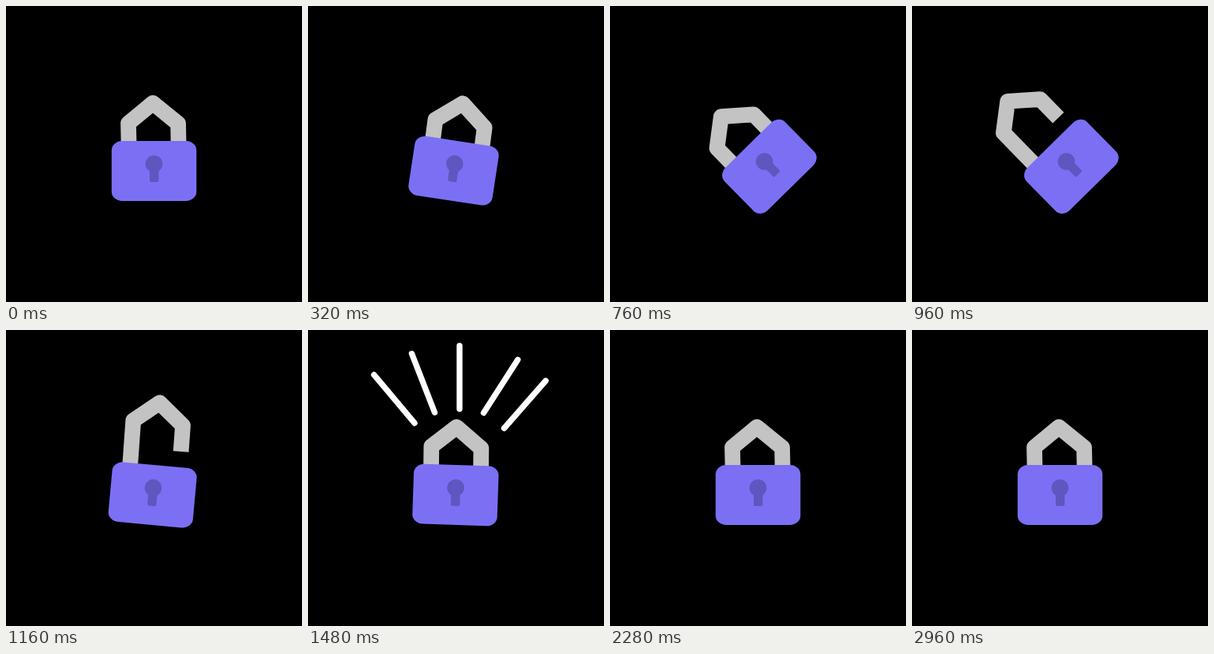
These frames come from a looping animation (375 px wide and 375 px high, 3 s). An HTML page:

```html
<!DOCTYPE html>
<html lang="en">
<head>
<meta charset="utf-8">
<title>Padlock</title>
<style>
  html, body { margin: 0; width: 100%; height: 100%; overflow: hidden; background: #000; }
  svg { display: block; width: 100vw; height: 100vh; }
</style>
</head>
<body>
<svg viewBox="0 0 375 375">
  <!-- Rays point up; the dash pattern grows and trims them -->
  <g id="rays" fill="none" stroke="#fff" stroke-width="7.4" stroke-linecap="round">
    <path transform="translate(135 118) rotate(-40)"/>
    <path transform="translate(160.5 104.5) rotate(-21.3)"/>
    <path transform="translate(192 100)"/>
    <path transform="translate(222.5 105) rotate(32.7)"/>
    <path transform="translate(248.5 124.5) rotate(41.2)"/>
  </g>
  <g id="lock">
    <path id="shackle" d="M156.4 213 L155 148.5 L186.1 122.9 L218.1 149 L218.8 182"
      fill="none" stroke="#c3c3c3" stroke-width="19.7" stroke-linejoin="round"/>
    <rect x="133.8" y="171" width="107.5" height="76" rx="13.5" ry="11.7" fill="#7b70f4"/>
    <g fill="#5f56bf">
      <circle cx="187.5" cy="200" r="10.8"/>
      <rect x="182" y="202" width="11.4" height="21" rx="2"/>
    </g>
  </g>
</svg>
<script>
  const LOOP = 3000;
  const RAY_LENGTH = 80;
  const WINDUP = 9;    // degrees clockwise before and after the main swing
  const SWING = 53.5;  // degrees from windup to the open pose
  const LIFT = 31;

  const lock = document.getElementById("lock");
  const shackle = document.getElementById("shackle");
  const rayGroup = document.getElementById("rays");

  // Smooth 0 to 1 between two times
  function ramp(t, from, to) {
    const u = Math.min(1, Math.max(0, (t - from) / (to - from)));
    return u * u * (3 - 2 * u);
  }

  function draw(t) {
    const windup = ramp(t, 40, 360) - ramp(t, 1200, 1600);
    const swing = ramp(t, 360, 720) - ramp(t, 960, 1200);
    const rise = LIFT * (ramp(t, 720, 1000) - ramp(t, 1200, 1360));

    lock.setAttribute("transform", `rotate(${WINDUP * windup - SWING * swing} 187.8 188.6)`);
    // The shackle lags slightly behind the body
    shackle.setAttribute("transform",
      `translate(${-rise * 0.015} ${-rise}) rotate(${1.5 * swing} 187 205)`);

    const tip = ramp(t, 1280, 1480), tail = ramp(t, 1480, 1680);
    rayGroup.setAttribute("visibility", tip > tail ? "visible" : "hidden");
    for (const ray of rayGroup.children) {
      ray.setAttribute("d", `M0 ${-RAY_LENGTH * tail} V${-RAY_LENGTH * tip}`);
    }
  }

  const start = performance.now();
  function tick() {
    draw((performance.now() - start) % LOOP);
    requestAnimationFrame(tick);
  }
  tick();
</script>
</body>
</html>
```
